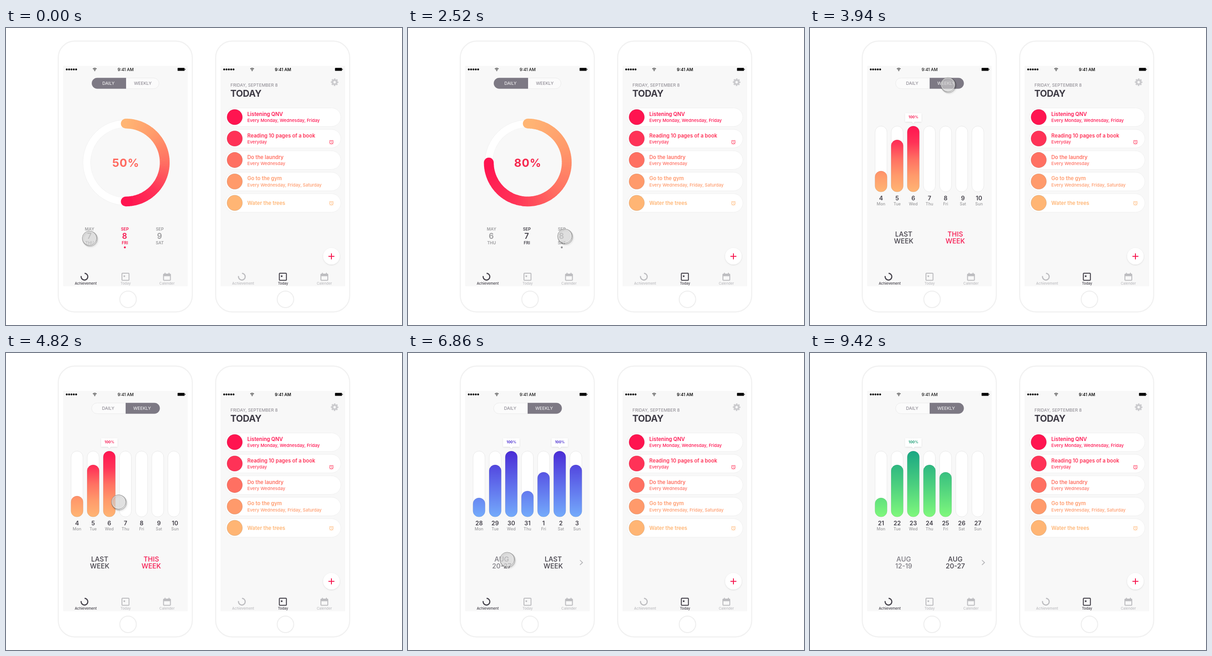
An HTML page that plays this animation: 864 by 648 pixels, repeating every 9.46 s.

```html
<!DOCTYPE html>
<html lang="en">
<head>
<meta charset="utf-8">
<title>Habit tracker</title>
<style>
html, body { margin: 0; width: 100%; height: 100%; overflow: hidden; background: #fff; }
svg { display: block; width: 864px; height: 648px; font-family: Inter, "Open Sans", sans-serif; }
.mid { text-anchor: middle; }
</style>
</head>
<body>
<svg id="stage" viewBox="0 0 864 648">
  <defs>
    <filter id="soft" x="-30%" y="-30%" width="160%" height="170%">
      <feDropShadow dx="0" dy="1" stdDeviation="1.6" flood-color="#000" flood-opacity=".13"/>
    </filter>
    <filter id="lift" x="-30%" y="-30%" width="170%" height="170%">
      <feDropShadow dx="1.5" dy="2" stdDeviation="1.2" flood-color="#000" flood-opacity=".35"/>
    </filter>
  </defs>
</svg>
<script>
const LOOP = 9460;
const DARK = '#434049', GRAY = '#9b9b9d', PALE = '#bdbdc0', RED = '#f6174f', PILL = '#7d7984';
const RAMP = ['#ffb574', '#ff9a6b', '#ff7062', '#ff3257', '#ff1450'];
const stage = document.getElementById('stage');

function el(tag, attrs, parent = stage) {
  const node = document.createElementNS('http://www.w3.org/2000/svg', tag);
  for (const k in attrs) node.setAttribute(k, attrs[k]);
  parent.appendChild(node);
  return node;
}
const group = (parent, attrs = {}) => el('g', attrs, parent);
const rect = (p, x, y, width, height, rx, fill, more) =>
  el('rect', { x, y, width, height, rx, fill, ...more }, p);
const circle = (p, cx, cy, r, fill, more) => el('circle', { cx, cy, r, fill, ...more }, p);
const path = (p, d, stroke, width, more) =>
  el('path', { d, stroke, 'stroke-width': width, fill: 'none', ...more }, p);
function text(p, str, x, y, size, fill, weight = 500, left = false, spacing = 0) {
  const t = el('text', { x, y, fill, 'font-size': size, 'font-weight': weight, 'letter-spacing': spacing }, p);
  if (!left) t.setAttribute('class', 'mid');
  t.textContent = str;
  return t;
}

// ---- phone body, status bar and tab bar ----
function phone(dx, active, timeWeight) {
  const g = group(stage, { transform: `translate(${dx} 0)` });
  rect(g, 114, 28.5, 292.5, 591, 36, '#fff', { stroke: '#f1f1f1', 'stroke-width': 2.4 });
  circle(g, 266.3, 592, 18, '#fff', { stroke: '#eeeeee', 'stroke-width': 2 });
  rect(g, 125.5, 83, 270.5, 480, 0, '#f8f8f8', { stroke: '#f3f3f3', 'stroke-width': .6 });
  for (let i = 0; i < 5; i++) circle(g, 132.6 + i * 5.1, 90.4, 2.1, '#111');
  path(g, 'M189.6 89.2a5.8 5.8 0 0 1 8 0M191.4 91.2a3.2 3.2 0 0 1 4.4 0', '#222', 1.3);
  circle(g, 193.6, 92.9, 1, '#222');
  text(g, '9:41 AM', 261, 93.7, 9.1, '#111', timeWeight);
  rect(g, 374.4, 87, 15.2, 6.6, 1.2, '#0a0a0a');
  rect(g, 390.3, 89, 1.2, 2.6, .5, '#0a0a0a');

  const tone = i => i === active ? DARK : PALE;
  path(g, 'M171.5 535.3A7.3 7.3 0 1 1 164 541.2', tone(0), 2.5);
  rect(g, 253, 535, 15.4, 15.4, 1.5, 'none', { stroke: tone(1), 'stroke-width': 2 });
  rect(g, 256.4, 539.8, 3.4, 3.4, .8, tone(1));
  rect(g, 343.7, 537, 15, 13.5, 1.5, 'none', { stroke: tone(2), 'stroke-width': 2 });
  rect(g, 343, 536.5, 16.4, 5, 1, tone(2));
  path(g, 'M347 534v4M355.6 534v4', tone(2), 2);
  ['Achievement', 'Today', 'Calender'].forEach((s, i) =>
    text(g, s, [174, 261, 351.2][i], 559.7, 7.7, tone(i)));
  return g;
}

// ---- right phone: list of habits ----
function habits() {
  const g = group(stage);
  text(g, 'FRIDAY, SEPTEMBER 8', 489.8, 128, 9.5, '#85828a', 400, true);
  text(g, 'TODAY', 489.5, 150, 20, '#3f3c46', 700, true, -.4);
  circle(g, 717, 118.2, 4.6, 'none', { stroke: '#cbcbce', 'stroke-width': 3.8 });
  circle(g, 717, 118.2, 7, 'none',
    { stroke: '#cbcbce', 'stroke-width': 2.6, 'stroke-dasharray': '3.1 2.398', 'stroke-dashoffset': 1.5 });
  const rows = [
    ['Listening QNV', 'Every Monday, Wednesday, Friday'],
    ['Reading 10 pages of a book', 'Everyday', 1],
    ['Do the laundry', 'Every Wednesday'],
    ['Go to the gym', 'Every Wednesday, Friday, Saturday'],
    ['Water the trees', '', 1]
  ];
  rows.forEach(([title, sub, alarm], i) => {
    const y = 194.4 + i * 46.8, color = RAMP[4 - i];
    rect(g, 478.5, y - 20, 252, 40.4, 20.2, '#fff', { stroke: '#f0f0f0', 'stroke-width': 1 });
    circle(g, 499, y, 16.9, color, { stroke: '#000', 'stroke-opacity': .16, 'stroke-width': .8 });
    text(g, title, 526.5, y + (sub ? -2.4 : 4), 11.2, color, 600, true);
    text(g, sub, 526.5, y + 11, 9.6, color, 500, true);
    if (alarm) {
      const ay = y + (sub ? 8 : .8);
      circle(g, 710, ay, 3.7, 'none', { stroke: color, 'stroke-width': 1.1 });
      path(g, `M710 ${ay - 2}v2.3l1.5 1M705.4 ${ay - 2.8}l2-1.8M714.6 ${ay - 2.8}l-2-1.8M707.4 ${ay + 3}l-1 1.2M712.6 ${ay + 3}l1 1.2`, color, 1);
    }
  });
  circle(g, 710, 498, 18, '#fff', { filter: 'url(#soft)' });
  path(g, 'M703.5 498.2h13M710 491.7v13', RED, 2);
}

// ---- left phone: daily / weekly switch ----
function toggle(parent, weekly) {
  const x = weekly ? 186.8 : 187.2;
  rect(parent, x, 109, weekly ? 148.6 : 146.6, 23.4, 11.7, '#fbfbfb', { stroke: '#ebebeb', 'stroke-width': 1 });
  path(parent, weekly
    ? 'M261 108.7h62.8a11.9 11.9 0 0 1 0 23.8h-62.8z'
    : 'M262 108.7h-63a11.9 11.9 0 0 0 0 23.8h63z', 'none', 0, { fill: PILL });
  text(parent, 'DAILY', weekly ? 223 : 223.6, 124, 9.4, weekly ? PILL : '#fff', 400);
  text(parent, 'WEEKLY', weekly ? 297 : 298.5, 124, 9.5, weekly ? '#fff' : PILL, 400);
}

// ---- daily ring ----
const CX = 261.3, CY = 293.5, R = 85, PARTS = 72;
const rgb = hex => [1, 3, 5].map(i => parseInt(hex.slice(i, i + 2), 16));
function ramp(u) {
  const s = Math.min(u * 4, 3.9999), i = Math.floor(s), a = rgb(RAMP[i]), b = rgb(RAMP[i + 1]);
  return `rgb(${a.map((v, k) => Math.round(v + (b[k] - v) * (s - i)))})`;
}
const polar = a => `${(CX + R * Math.sin(a)).toFixed(2)} ${(CY - R * Math.cos(a)).toFixed(2)}`;

function ring(parent) {
  circle(parent, CX, CY, R, 'none', { stroke: '#eeeeee', 'stroke-width': 17.4 });
  circle(parent, CX, CY, R, 'none', { stroke: '#fff', 'stroke-width': 16 });
  const parts = Array.from({ length: PARTS }, (_, i) =>
    path(parent, '', ramp(i / (PARTS - 1)), 21.4,
      { 'stroke-linecap': i === 0 || i === PARTS - 1 ? 'round' : 'butt' }));
  return sweep => parts.forEach((p, i) => {
    const a = sweep * i / PARTS, b = sweep * (i + 1) / PARTS;
    p.setAttribute('d', `M${polar(i ? a - .008 : a)}A${R} ${R} 0 0 1 ${polar(b)}`);
  });
}

function day(percent, color, first, mid, dotX) {
  const g = group(daily);
  text(g, percent, CX, 303, 24.5, color, 700, false, .8);
  [['MAY', 'THU'], ['SEP', 'FRI'], ['SEP', 'SAT']].forEach(([month, name], i) => {
    const x = [182.3, 259.3, 335.5][i], c = i === 1 ? mid : GRAY;
    text(g, month, x, 442.2, 9, c, 600);
    text(g, first + i, x - .5, 459.6, 17, c, 600);
    text(g, name, x, 471.8, 9, c, 600);
  });
  circle(g, dotX, 478.7, 2.1, dotX < 300 ? RED : '#8d8d90');
  return g;
}

// ---- weekly bars ----
const TOP = 214, BOTTOM = 357.5;
const barX = i => 142 + i * 35.2;

function week(id, stops, tip, tops, dates, shift, labels, tones, arrow) {
  const g = group(weekly);
  const grad = el('linearGradient',
    { id, gradientUnits: 'userSpaceOnUse', x1: 0, x2: 0, y1: TOP, y2: BOTTOM }, g);
  stops.forEach((c, i) => el('stop', { offset: i / (stops.length - 1), 'stop-color': c }, grad));
  dates.forEach((n, i) => {
    const x = barX(i), cx = x + 13 + (i > 4 ? shift : 0), y = tops[i];
    if (y) rect(g, x - .2, y, 26.4, BOTTOM - y, 13.1, `url(#${id})`,
      { stroke: '#000', 'stroke-opacity': .13, 'stroke-width': .6 });
    if (y === TOP) {
      const m = x + 13;
      path(g, `M${m - 17.7} 186h35.4v18.6h-14.7l-3 3.6l-3-3.6h-14.7z`, 'none', 0,
        { fill: '#fff', filter: 'url(#soft)' });
      text(g, '100%', m + .4, 197.4, 7.5, tip, 700, false, .1);
    }
    text(g, n, cx, 376, 12.8, DARK, 600);
    text(g, ['Mon', 'Tue', 'Wed', 'Thu', 'Fri', 'Sat', 'Sun'][i], cx, 387, 8.9, GRAY, 500);
  });
  labels.forEach((lines, i) => lines.forEach((s, k) =>
    text(g, s, i ? 317 : 204.5, 454.6 + k * 15.8, 14.6, tones[i], 500)));
  if (arrow) path(g, 'M375.2 452l5.6 5.2l-5.6 5.2', '#b4b4b7', 1.7);
  return g;
}

// ---- build ----
const left = phone(0, 0, 500);
phone(343.4, 1, 600);
habits();

const daily = group(left), weekly = group(left);
toggle(daily, false);
const setSweep = ring(daily);
const days = [
  day('50%', '#ff6a60', 7, RED, 259.3),
  day('80%', '#f6294f', 6, DARK, 335.5)
];

toggle(weekly, true);
for (let i = 0; i < 7; i++)
  rect(weekly, barX(i), TOP, 26, BOTTOM - TOP, 13, '#fff', { stroke: '#e9e9e9', 'stroke-width': 1 });
const LAST = ['LAST', 'WEEK'];
const weeks = [
  week('warm', RAMP.slice().reverse(), RED, [312, 244, 214],
    [4, 5, 6, 7, 8, 9, 10], 2.6, [LAST, ['THIS', 'WEEK']], [DARK, RED]),
  week('cool', ['#4a2cd6', '#5f6ceb', '#74abfb'], '#4528cf', [316, 244, 214, 301, 260, 214, 244],
    [28, 29, 30, 31, 1, 2, 3], 2.6, [['AUG', '20-27'], LAST], ['#7d7b82', DARK], true),
  week('fresh', ['#1aa783', '#4ace7f', '#7ff87c'], '#159a70', [316, 244, 214, 244, 260],
    [21, 22, 23, 24, 25, 26, 27], 0, [['AUG', '12-19'], ['AUG', '20-27']], ['#7d7b82', DARK], true)
];

const cursor = group(stage);
circle(cursor, 1.2, 1.6, 15.8, 'none', { stroke: '#000', 'stroke-opacity': .22, 'stroke-width': 2.4, filter: 'url(#lift)' });
circle(cursor, 0, 0, 15.4, 'rgb(208,208,208)', { 'fill-opacity': .64, stroke: '#858585', 'stroke-width': 1 });
circle(cursor, 0, 0, 14.3, 'none', { stroke: '#fff', 'stroke-opacity': .55, 'stroke-width': 1.2 });

// ---- motion ----
const inOut = u => u < .5 ? 4 * u ** 3 : 1 - 4 * (1 - u) ** 3;
const out = u => 1 - (1 - u) ** 3;
const into = u => u ** 2;
const span = (t, a, b, ease = inOut) => ease(Math.min(1, Math.max(0, (t - a) / (b - a))));

// from, to, end point, bend point (optional), easing (optional)
const moves = [
  [60, 600, [342, 454]],
  [2500, 3340, [301, 123.5], [382, 310]],
  [4300, 5260, [211, 451]],
  [5270, 5800, [336, 452.5]],
  [6540, 7000, [201, 450]],
  [7220, 7700, [364.7, 460]],
  [8940, 9420, [704, -24], [372, 190], into]
];

function cursorAt(t) {
  let p = [182, 458.5];
  for (const [a, b, end, bend, ease] of moves) {
    if (t < a) break;
    const u = span(t, a, b, ease), start = p;
    const c = bend || start.map((v, i) => (v + end[i]) / 2);
    p = start.map((v, i) => v * (1 - u) ** 2 + 2 * c[i] * u * (1 - u) + end[i] * u * u);
  }
  return p;
}

const fade = (node, o) => node.setAttribute('opacity', o.toFixed(3));
const show = (node, on) => node.setAttribute('display', on ? 'inline' : 'none');

function render(t) {
  show(daily, t < 3940);
  show(weekly, t >= 3940);
  const d = span(t, 540, 1160, out);
  setSweep(Math.PI * (1 + d / 2));
  fade(days[0], 1 - d);
  fade(days[1], d);
  const w1 = span(t, 5920, 6340), w2 = span(t, 7640, 8060);
  fade(weeks[0], 1 - w1);
  fade(weeks[1], w1 * (1 - w2));
  fade(weeks[2], w2);
  cursor.setAttribute('transform', `translate(${cursorAt(t).map(v => v.toFixed(2)).join(' ')})`);
}

let begin;
function tick(now) {
  if (begin === undefined) begin = now;
  render((now - begin) % LOOP);
  requestAnimationFrame(tick);
}
render(0);
requestAnimationFrame(tick);
</script>
</body>
</html>
```
